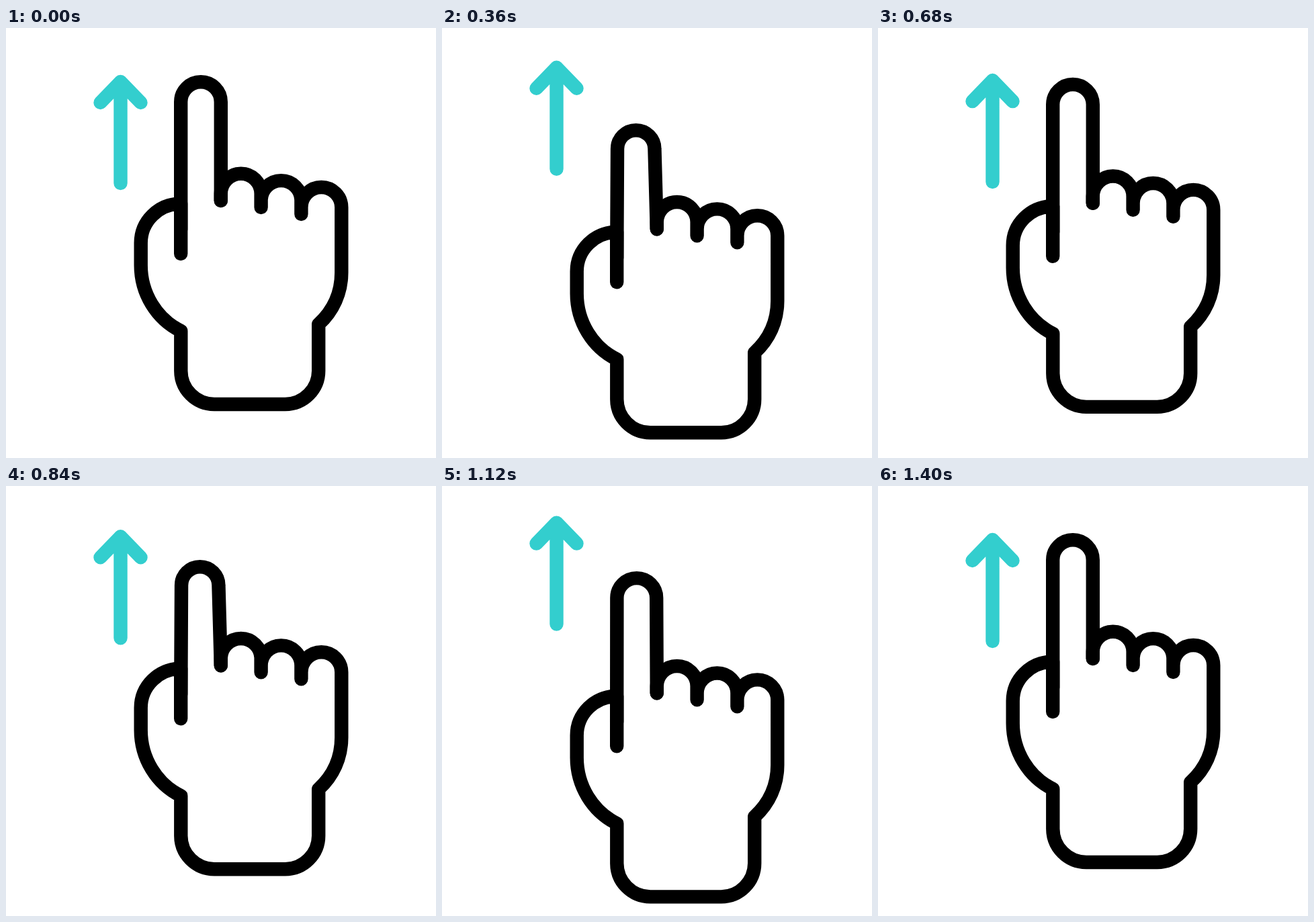
These frames come from a looping animation (640x640 px, 1480 ms). An HTML page:

```html
<!DOCTYPE html>
<html lang="en">
<head>
<meta charset="utf-8">
<title>Swipe up</title>
<style>
  html, body { margin: 0; height: 100%; overflow: hidden; background: #fff; }
  svg { display: block; width: 100vw; height: 100vh; }
  path { fill: none; stroke: #000; stroke-width: 20.4; stroke-linecap: round; stroke-linejoin: round; }
  #arrow { stroke: #33cece; }
</style>
</head>
<body>
<svg viewBox="0 0 640 640">
  <path id="arrow" d="M170.5 231V80M140.5 111L170.5 80L200.5 111"/>
  <g id="hand">
    <path d="M260.2 300V261.5C227 261.5 200.7 288 200.7 320V353C200.7 395 224 433 260.3 451
      V510A49.8 49.8 0 0 0 310 560H415.5A49.8 49.8 0 0 0 465.2 510V441
      C487 421 499.3 394 499.3 364V267A29.9 29.9 0 0 0 439.4 267V277
      V257A29.9 29.9 0 0 0 379.6 257V267V246.6A29.9 29.9 0 0 0 319.8 246.6V257"/>
    <path id="finger"/>
  </g>
</svg>
<script>
const [arrow, hand, finger] = ["arrow", "hand", "finger"].map(id => document.getElementById(id));
const LOOP = 1480, STEP = 40, CYCLE = 17;

function ease(from, to, k) {
  const x = Math.min(1, Math.max(0, (k - from) / (to - from)));
  return x * x * (3 - 2 * x);
}

const pulse = (k, peak, fallEnd) => k < peak ? ease(0, peak, k) : 1 - ease(peak, fallEnd, k);
const mix = (a, b, x) => a + (b - a) * x;

function fingerPath(bend) {
  const left = mix(260.2, 261.2, bend), right = mix(319.8, 315.8, bend);
  const y = mix(110, 142.7, bend), r = (right - left) / 2;
  return `M260.2 336V300L${left} ${y}A${r} ${r} 0 0 1 ${right} ${y}L319.8 257`;
}

function draw(now) {
  // The first pose is held for one extra step.
  const step = Math.max(0, Math.floor((now % LOOP) / STEP) - 1);
  const second = step >= CYCLE, k = step % CYCLE;

  // On the second swipe the hand runs slightly ahead of the arrow.
  const drop = second ? pulse(k, 10.5, 16.6) : pulse(k, 11, 17);
  const bend = ease(0, 4, k) - ease(7, 11, k);

  arrow.setAttribute("transform", `translate(0 ${-26 * pulse(k, 11, 17)})`);
  hand.setAttribute("transform", `translate(0 ${51.7 * drop})`);
  finger.setAttribute("d", fingerPath(bend));
}

function tick() {
  draw(performance.now());
  requestAnimationFrame(tick);
}
tick();
</script>
</body>
</html>
```
